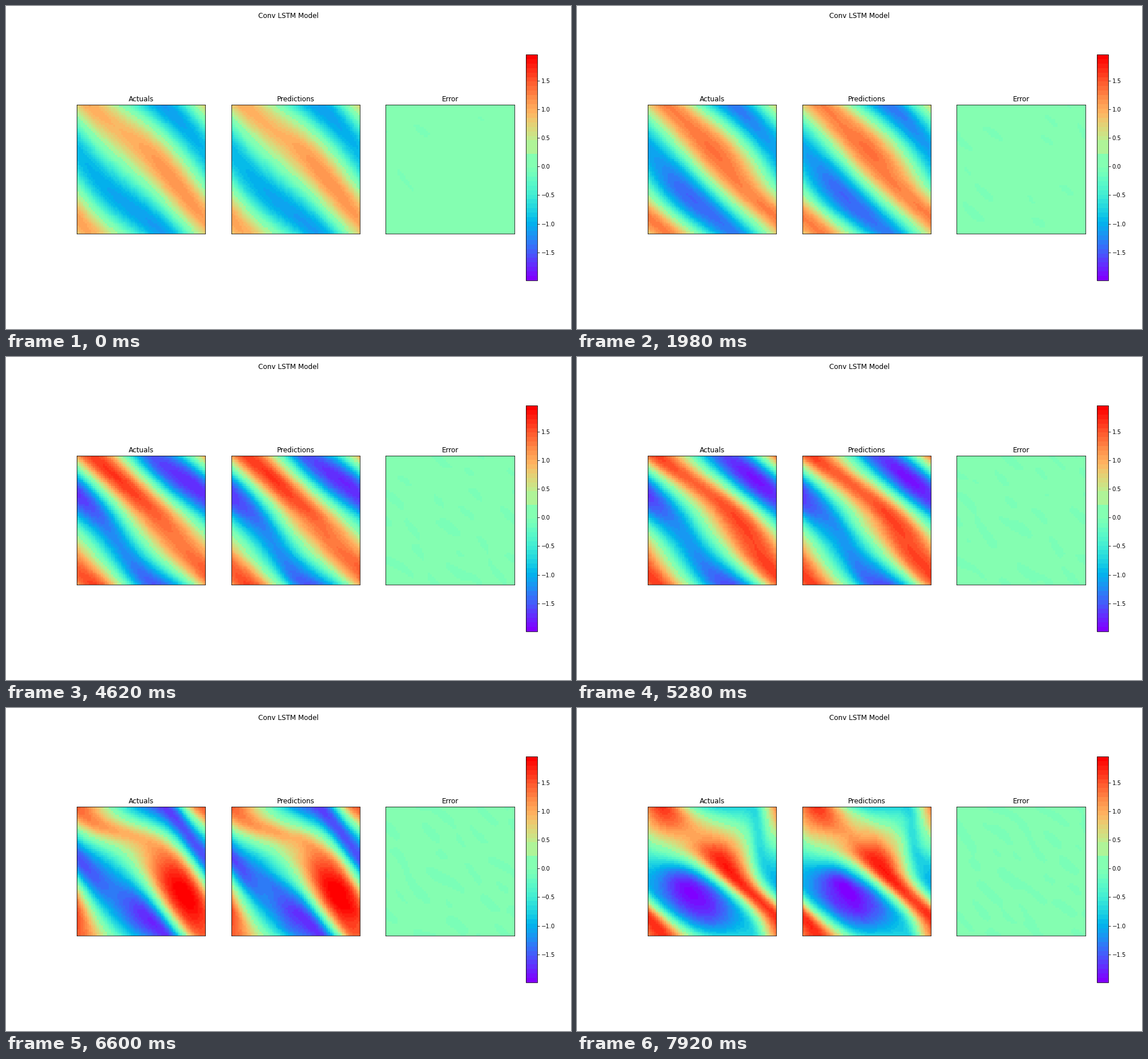
Write a matplotlib script that moves like this. It is 990 px wide and 566 px high and loops after 8 s.

```python
import numpy as np
import matplotlib.pyplot as plt
from matplotlib.animation import FuncAnimation
from matplotlib.colors import ListedColormap

LOOP, TICK, HOLD = 8000, 50, 330
STEPS = 25
N, NU, DT = 64, 1e-3, 0.05
START = 11          # flow time of the first step
VMIN, VMAX = -1.993, 1.958

# Four long waves (kx, ky) steer the flow; their complex amplitudes at key steps
WAVES = [(1, 0), (0, 1), (2, 1), (1, 2)]
KEYS = {
    0: (-.032 + .05j, .006 + .037j, .015 - .024j, .063 - .009j),
    10: (.008 - .005j, -.041 - .004j, .045 - .021j, -.056 - .031j),
    14: (-.022 - .085j, -.025 - .008j, .103 + .014j, -.044 - .011j),
    18: (-.059 - .089j, .095 + .13j, .142 + .037j, .11 + .003j),
    22: (.021 + .169j, .168 + .2j, -.045, .194 + .032j),
}

# Rows are x (upwards), columns are y (rightwards)
grid = np.arange(N) / N
X, Y = np.meshgrid(grid, grid, indexing="ij")
freq = 2j * np.pi * np.fft.fftfreq(N, 1 / N)
KX, KY = np.meshgrid(freq, freq, indexing="ij")
K2 = -(KX**2 + KY**2).real
INV_K2 = 1 / np.where(K2 == 0, 1, K2)
KEEP = (abs(KX) < 2 * np.pi * N / 3) & (abs(KY) < 2 * np.pi * N / 3)
STRIPES = np.sin(2 * np.pi * (X + Y)) + np.cos(2 * np.pi * (X + Y))
FORCE = np.fft.fft2(0.1 * STRIPES)


def real(h):
    return np.fft.ifft2(h).real


def rate(h):
    """Forced 2D Navier-Stokes in vorticity form."""
    psi = h * INV_K2
    adv = real(KY * psi) * real(KX * h) - real(KX * psi) * real(KY * h)
    return -np.fft.fft2(adv) * KEEP - NU * K2 * h + FORCE


def advance(w):
    """One time unit by fourth-order Runge-Kutta."""
    h = np.fft.fft2(w) * KEEP
    for _ in range(round(1 / DT)):
        a = rate(h)
        b = rate(h + DT / 2 * a)
        c = rate(h + DT / 2 * b)
        d = rate(h + DT * c)
        h = h + DT / 6 * (a + 2 * b + 2 * c + d)
    return real(h)


def steer(w, amps):
    """Field that brings the long waves of w to the given amplitudes."""
    fix = np.zeros_like(w)
    for (p, q), amp in zip(WAVES, amps):
        wave = np.exp(2j * np.pi * (p * (X + 0.5 / N) + q * (Y + 0.5 / N)))
        fix += 2 * ((amp - (w * wave.conj()).mean()) * wave).real
    return fix


def solve():
    decay = 8 * np.pi**2 * NU
    laminar = 0.1 / decay * (1 - np.exp(-START * decay)) * STRIPES
    out = [laminar + steer(laminar, KEYS[0])]
    times = sorted(KEYS)
    for start, stop in zip(times, times[1:] + [STEPS - 1]):
        run = [out[-1]]
        for _ in range(stop - start):
            run.append(advance(run[-1]))
        fix = steer(run[-1], KEYS[stop]) if stop in KEYS else 0
        out += [w + fix * j / (stop - start) for j, w in enumerate(run) if j]
    return out


rng = np.random.default_rng(4)
ripples = [(rng.integers(1, 7), rng.integers(1, 7), rng.uniform(0, 2 * np.pi),
            rng.uniform(-0.25, 0.25)) for _ in range(14)]


def model_error(n):
    """Small diagonal ripples that grow with the forecast time."""
    total = sum(np.cos(2 * np.pi * (p * X + q * Y) + phase + speed * n)
                for p, q, phase, speed in ripples)
    return (0.008 + 0.0006 * n) * total / np.sqrt(len(ripples) / 2)


actual = solve()
errors = [model_error(n) for n in range(STEPS)]

colors = plt.get_cmap("rainbow")(np.linspace(0, 1, 50))
colors[25:28] = colors[25]
colors[28:31] = colors[29]
cmap = ListedColormap(colors)

fig, axes = plt.subplots(1, 3, figsize=(990 / 72, 566 / 72), dpi=72)
fig.suptitle("Conv LSTM Model")
images = []
for ax, title in zip(axes, ("Actuals", "Predictions", "Error")):
    ax.set_title(title)
    ax.set_xticks([])
    ax.set_yticks([])
    images.append(ax.imshow(np.zeros((N, N)), cmap=cmap, vmin=VMIN, vmax=VMAX,
                            origin="lower"))
fig.colorbar(images[0], cax=fig.add_axes([0.92, 0.15, 0.02, 0.7]))


def update(i):
    n = min((i * TICK + TICK - 1) // HOLD, STEPS - 1)
    w, err = actual[n], errors[n]
    for im, data in zip(images, (w, w - err, err)):
        im.set_data(data)
    return images


anim = FuncAnimation(fig, update, frames=LOOP // TICK, interval=TICK,
                     init_func=lambda: update(0), repeat=True)
plt.show()
```
